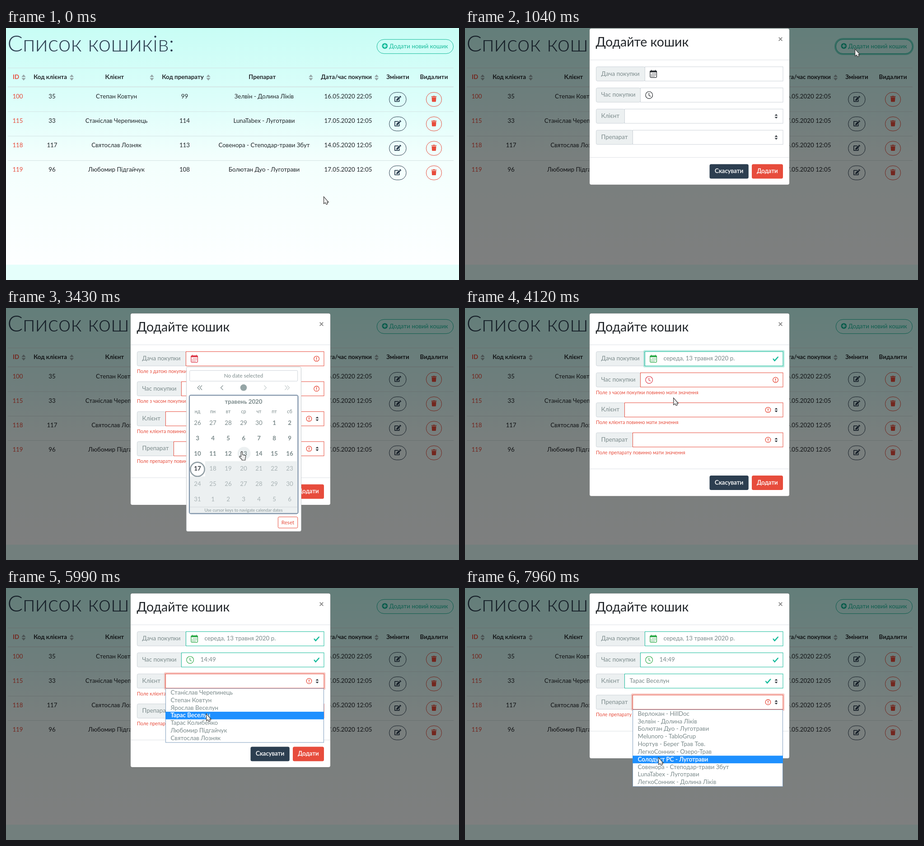
Animation of 1003 by 558 pixels, one loop 8 s. Source, as an HTML page:

```html
<!DOCTYPE html>
<html lang="uk">
<head>
<meta charset="utf-8">
<title>Список кошиків</title>
<style>
html, body { margin: 0; width: 100%; height: 100%; overflow: hidden; }
svg { display: block; width: 1003px; height: 558px; font-family: Lato, "Open Sans", sans-serif; }
text { white-space: pre; }
</style>
</head>
<body>
<svg id="stage" viewBox="0 0 1003 558"></svg>
<script>
const LOOP = 8000;
const RED = '#e74c3c', TEAL = '#18bc9c', NAVY = '#2c3e50', INK = '#212529', MUTED = '#7b8a8b', LINE = '#ced4da';
const stage = document.getElementById('stage');

// Drawing helpers; text is placed by its vertical centre
const text = (x, cy, s, fill = INK, o = {}) => {
  const size = o.size || 13.33;
  return `<text x="${x}" y="${(cy + size * .35).toFixed(2)}" font-size="${size}" fill="${fill}"
    font-weight="${o.weight || 400}" text-anchor="${o.anchor || 'start'}"
    ${o.heavy ? `stroke="${fill}" stroke-width=".3"` : ''}>${s}</text>`;
};
const mid = (x, cy, s, fill, o = {}) => text(x, cy, s, fill, { ...o, anchor: 'middle' });
const rect = (x, y, w, h, fill, stroke = 'none', r = 0, more = '') =>
  `<rect x="${x}" y="${y}" width="${w}" height="${h}" rx="${r}" fill="${fill}" stroke="${stroke}" ${more}/>`;
const circle = (x, y, r, fill, stroke = 'none', w = 1) =>
  `<circle cx="${x}" cy="${y}" r="${r}" fill="${fill}" stroke="${stroke}" stroke-width="${w}"/>`;
const path = (d, fill, stroke = 'none', w = 1, place = '') =>
  `<path d="${d}" fill="${fill}" stroke="${stroke}" stroke-width="${w}" transform="${place}"/>`;
const group = (body, attrs) => `<g ${attrs}>${body}</g>`;
const at = (x, y, s = 1) => `translate(${x} ${y}) scale(${s})`;

const clamp = v => Math.max(0, Math.min(1, v));
const ramp = (t, start, length) => clamp((t - start) / length);
const easeOut = p => 1 - (1 - p) ** 2;
const within = (t, a, b) => t >= a && t < b;

const TRASH = 'M432 32H312l-9-19a24 24 0 0 0-22-13H167a24 24 0 0 0-22 13l-9 19H16A16 16 0 0 0 0 48v32a16 16 0 0 0 16 16h416a16 16 0 0 0 16-16V48a16 16 0 0 0-16-16zM53 467a48 48 0 0 0 48 45h246a48 48 0 0 0 48-45l21-339H32z';
const EDIT = 'M403 83l90 90q7 7 0 14L274 406l-93 10q-23 0-21-22l10-92L389 83q7-7 14 0zM565 60l-49-48q-28-24-55 0l-36 35q-7 7 0 14l90 90q7 7 14 0l36-35q24-28 0-56zM384 346V448H64V128h230l8-4 40-40q9-14-8-20H48Q0 64 0 112v352q0 48 48 48h352q48 0 48-48V306q-4-18-20-8l-40 40z';
const CHECK = 'M2.3 6.73L.6 4.53c-.4-1.04.46-1.4 1.1-.8l1.1 1.4 3.4-3.8c.6-.63 1.6-.27 1.2.7l-4 4.6c-.43.5-.8.4-1.1.1z';
const ARROW = 'M.5.5V16l3.6-2.3 2.2 4 2.9-1.5-1.2-3.6h3.2Z';
const HAND = 'M-1.6 11V1.5a1.6 1.6 0 0 1 3.2 0V7l5.6 1.3q2 .6 1.7 2.6l-1.2 5.6V19H.2v-2L-4.8 12.4q-1.2-2.2.8-2.6Z';

const rows = [
  [100, 35, 'Степан Ковтун', 99, 'Зелвін - Долина Ліків', '16.05.2020 22:05'],
  [115, 33, 'Станіслав Черепинець', 114, 'LunaTabex - Луготрави', '17.05.2020 12:05'],
  [118, 117, 'Святослав Лозняк', 113, 'Совенора - Степодар-трави Збут', '14.05.2020 12:05'],
  [119, 96, 'Любомир Підгайчук', 108, 'Болютан Дуо - Луготрави', '17.05.2020 12:05']
];
const clients = [rows[1][2], rows[0][2], 'Ярослав Веселун', 'Тарас Веселун', 'Тарас Колибенко', rows[3][2], rows[2][2]];
const drugs = ['Верлокан - HillDoc', rows[0][4], rows[3][4], 'Melunoro - TabloGrup', 'Нортув - Берег Трав Тов.',
  'ЛегкоСонник - Озеро-Трав', 'Солодукт РС - Луготрави', rows[2][4], rows[1][4], 'ЛегкоСонник - Долина Ліків'];
const heads = [[22, 'ID', 39], [98, 'Код клієнта', 145.5], [240.3, 'Клієнт', 323], [391.5, 'Код препарату', 448],
  [567.3, 'Препарат', 675], [753.5, 'Дата/час покупки', 820.5], [867.4, 'Змінити'], [947.5, 'Видалити']];
const columns = [26, 102, 244.5, 395.5, 571.5, 757.5];

// Pointer: time, x, y
const track = [[0, 703, 373], [30, 703, 373], [720, 862, 47], [810, 863, 46], [1050, 863, 46], [1640, 668, 322],
  [1760, 668, 322], [2500, 494, 114], [2720, 494, 114], [3430, 522, 318], [3660, 522, 318], [4350, 440, 157],
  [4490, 440, 157], [4890, 451, 306], [4950, 451, 306], [5270, 446, 220], [5390, 446, 212], [5590, 446, 212],
  [5990, 443, 278], [6690, 443, 278], [6810, 434, 268], [6990, 434, 268], [7080, 434, 260], [7290, 434, 260],
  [7950, 428, 375], [LOOP, 428, 375]];

function pointerAt(t) {
  const i = track.findIndex(k => k[0] > t);
  const a = track[i - 1], b = track[i];
  let p = ramp(t, a[0], b[0] - a[0]);
  p = p * p * (3 - 2 * p);
  return [a[1] + (b[1] - a[1]) * p, a[2] + (b[2] - a[2]) * p];
}

function addButton(t) {
  const hover = t < 860 ? easeOut(ramp(t, 665, 150)) : 0;
  const ring = ramp(t, 850, 100) - ramp(t, 1150, 150);
  const face = (fill, plus) => circle(838.8, 39.8, 6.4, fill) +
    path('M838.8 36v7.6M835 39.8h7.6', 'none', plus, 2.2) + text(848.5, 40.3, 'Додати новий кошик', fill);
  return rect(819.5, 23.7, 172.5, 34.6, 'none', TEAL, 17, `stroke-width="3" opacity="${ring * .5}"`) +
    rect(821.2, 25.3, 169.3, 31.4, TEAL, TEAL, 15.7, `fill-opacity="${hover}"`) +
    group(face(TEAL, '#cdfcf5'), `opacity="${1 - hover}"`) +
    group(face('#fff', TEAL), `opacity="${hover}"`);
}

function page(t, py) {
  let s = rect(0, 0, 1003, 524, 'url(#sky)') + rect(0, 524, 1003, 34, '#e5fffb');
  s += text(3.5, 34.7, 'Список кошиків:', NAVY, { size: 49.8, weight: 300 }) + addButton(t);
  s += rect(4, 88, 987, 1, '#d3e3e3') + rect(4, 129.5, 987, 1.8, '#d3e3e3');
  heads.forEach(([x, name, sort], i) => {
    s += mid(x, 108.5, name, i ? INK : RED, { weight: 700 });
    if (sort) s += path('M-4.7-1h9.4L0-6.5ZM-4.7 1.2h9.4L0 6.7Z', '#95a5a6', 'none', 1, at(sort, 109.5));
  });
  rows.forEach((row, i) => {
    const y = i * 54.2;
    if (t < 840 && within(py, 131 + y, 185 + y)) s += rect(4, 131 + y, 987, 54, 'rgba(0,0,0,.05)');
    if (i) s += rect(4, 130.4 + y, 987, 1, '#d3e3e3');
    row.forEach((v, c) => s += mid(columns[c], 151 + y, v, c ? INK : RED));
    s += rect(848.6, 142.5 + y, 37.6, 31.2, 'none', NAVY, 15.6) + path(EDIT, NAVY, 'none', 1, at(860, 150.2 + y, .026));
    s += rect(930.4, 142.5 + y, 34.2, 31.2, 'none', RED, 15.6) + path(TRASH, RED, 'none', 1, at(941.7, 150.2 + y, .026));
  });
  return s;
}

function calendarIcon(y, color) {
  let s = rect(409.8, y - 7, 14.6, 14.8, 'none', color, 1.8, 'stroke-width="1.2"') + rect(409.5, y - 6.5, 15, 2.8, color) +
    path(`M412.7 ${y - 9}v3M421.5 ${y - 9}v3`, 'none', color, 1.2);
  for (let i = 1; i < 11; i++) s += rect(411.8 + i % 4 * 3, y - 1.6 + (i >> 2) * 3, 1.5, 1.5, color);
  return s;
}
const clockIcon = (y, color, full) => circle(407.6, y, 7.8, full ? color : 'none', color, 1.2) +
  path(`M407.3 ${y - 4.6}v5.2l3.7 2.2`, 'none', full ? '#fff' : color, 1.2);

// Field state: 0 plain, 1 missing, 2 valid
function field(f, y) {
  const c = y + 16, x = f.x, border = f.border || [LINE, RED, TEAL][f.state];
  let s = rect(290.4, y + .4, x - 290, 31.6, '#ecf0f1', LINE, 3) + text(301.5, c - .6, f.label, MUTED);
  if (f.ring) s += rect(x - 1.3, y - 1.3, 707 - x, 35, 'none', border, 1, 'stroke-width="3.4" opacity=".3"');
  s += rect(x + .4, y + .4, 703.6 - x, 31.6, '#fff', border);
  if (f.icon) s += f.icon(c + .3, f.tint || [INK, '#dc3545', '#28a745'][f.state], f.full);
  if (f.value) s += text(f.valueX, c - .8, f.value, MUTED);
  if (f.select) s += path('M-3.4-1.2h6.8L0-5ZM-3.4 1.2h6.8L0 5Z', '#343a40', 'none', 1, at(689, c + .5));
  const ix = f.select ? 671 : 687.6;
  if (f.state == 1) {
    s += circle(ix, c + .2, 5.8, 'none', RED, 1.3) + path(`M${ix} ${c - 3}v4`, 'none', RED, 1.7) + circle(ix, c + 3, .95, RED);
    s += text(290, y + 44, f.error, RED, { size: 10.67 });
  }
  if (f.state == 2) s += path(CHECK, TEAL, 'none', 1, at(ix - 7, c - 6.6, 1.8));
  return s;
}

function options(list, x, y, py) {
  const step = 16.85, h = list.length * step + 1.5;
  let s = rect(x + .5, y, 703 - x, h, '#fff', '#7f9dbd');
  list.forEach((name, i) => {
    const top = y + .8 + i * step, on = within(py, top, top + step);
    if (on) s += rect(x, top, 704 - x, step, '#1e90ff');
    s += text(x + 11.5, top + 7.8, name, on ? '#fff' : MUTED, { heavy: on });
  });
  return s;
}

function calendar([px, py]) {
  const gray = '#ecf0f1', small = { size: 11.66 };
  let s = rect(399.4, 130.5, 254, 364, '#fff', '#c4c9cb', 3) + rect(406.7, 138.4, 239, 23.6, '#fff', LINE, 2) +
    mid(526, 150.2, 'No date selected', MUTED, small) + circle(526, 176.3, 7.3, '#95a5a6');
  const chevron = (x, d, o) =>
    group(path(`M${x + 2.5 * d} 171.5l${-5 * d} 5 ${5 * d} 5`, 'none', MUTED, 1.1), `opacity="${o}"`);
  s += chevron(426.5, 1, 1) + chevron(431.5, 1, 1) + chevron(478, 1, 1) +
    chevron(574, -1, .45) + chevron(620, -1, .45) + chevron(625, -1, .45);
  s += rect(406.5, 193.7, 239.5, 261, '#fff', '#a9b9c9', 3, 'stroke-width="4"') + rect(406.5, 193.7, 239.5, 261, '#fff', '#59718c', 2);
  s += rect(407.2, 339.3, 238, 114.7, gray) + rect(407.2, 339.3, 33.6, 33.6, '#fff') + rect(407.2, 440.3, 238, 1, '#d3d9db');
  s += mid(526, 207, 'травень 2020', MUTED, { weight: 700 });
  ['нд', 'пн', 'вт', 'ср', 'чт', 'пт', 'сб'].forEach((d, i) => s += mid(424 + i * 34, 229.5, d, MUTED, { size: 10.67 }));
  for (let i = 0; i < 42; i++) {
    const x = 424 + i % 7 * 34, y = 254.3 + Math.floor(i / 7) * 33.8, day = i - 4;
    const label = day < 1 ? day + 30 : day > 31 ? day - 31 : day;
    if (day < 17 && Math.hypot(px - x, py - y) < 15) s += circle(x + 1, y, 14.4, gray);
    if (day == 17) s += circle(x, y + 1.5, 15.6, '#fff', '#929fa5', 2.6);
    const fill = day == 17 ? '#343a40' : day > 17 ? '#a9b3b5' : MUTED;
    s += mid(x, y, label, fill, { weight: within(day, 1, 18) ? 700 : 400 });
  }
  return s + mid(526, 447.7, 'Use cursor keys to navigate calendar dates', '#8b989a', { size: 9.33 }) +
    rect(602.4, 462.6, 43.4, 24.6, '#fff', RED, 2.5) + mid(624, 474.5, 'Reset', RED, small);
}

function modal(t, pointer) {
  const missing = t >= 1720 ? 1 : 0;
  const state = done => t >= done ? 2 : missing;
  const settling = within(t, 4900, 5000);
  const fields = [
    { label: 'Дача покупки', x: 398, state: state(3650), icon: calendarIcon, error: 'Поле з датою покупки повинно мати значення',
      value: t >= 3650 && 'середа, 13 травня 2020 р.', valueX: 439.5, ring: within(t, 3650, 4400) },
    { label: 'Час покупки', x: 388, state: state(4900), icon: clockIcon, error: 'Поле з часом покупки повинно мати значення',
      value: t >= 4900 && '14:49', valueX: 430.5, border: settling && RED,
      tint: settling && '#dc3545', full: within(t, 4490, 5000) },
    { label: 'Клієнт', x: 353, state: state(6700), select: true, error: 'Поле клієнта повинно мати значення',
      value: t >= 6700 && clients[3], valueX: 364.5, ring: within(t, 5560, 7240) },
    { label: 'Препарат', x: 371, state: state(LOOP), select: true, error: 'Поле препарату повинно мати значення', ring: t >= 7240 }
  ];
  let y = 96.2, body = '';
  for (const f of fields) {
    body += field(f, y);
    f.bottom = y + 32.8;
    y += 46.8 + (f.state == 1 ? 19.6 : 0);
  }
  const foot = y + 13.5;
  const button = (x, w, fill, label) => rect(x, foot + 15.3, w, 32, fill, 'none', 3.5) +
    mid(x + w / 2, foot + 30.2, label, '#fff', { heavy: true });
  let s = rect(275.6, 11.8, 442.8, foot + 49.2, '#fff', 'rgba(0,0,0,.3)', 4) +
    text(289.5, 42, 'Додайте кошик', INK, { size: 28.4 }) + mid(698.5, 35, '×', '#858585', { size: 19, weight: 700 }) +
    rect(276, 81, 442, 1, '#dee2e6') + rect(276, foot, 442, 1, '#dee2e6') + body +
    button(541.5, 86.3, NAVY, 'Скасувати') + button(635, 69, RED, 'Додати');
  if (within(t, 2720, 3650)) s += calendar(pointer);
  if (within(t, 5580, 6700)) s += options(clients, 353, fields[2].bottom, pointer[1]);
  if (t >= 7240) s += options(drugs, 371, fields[3].bottom, pointer[1]);
  const slide = -50 * (1 - easeOut(ramp(t, 880, 300)));
  return group(s, `transform="translate(0 ${slide})" opacity="${ramp(t, 870, 150)}"`);
}

function scene(t) {
  const pointer = pointerAt(t);
  const hand = within(t, 650, 840) || within(t, 1590, 1780) || within(t, 2860, 3660);
  let s = `<defs><linearGradient id="sky" x2="0" y2="1"><stop stop-color="#c8fdf5"/>
    <stop offset=".3" stop-color="#dcfefa"/><stop offset=".55" stop-color="#f3fffd"/>
    <stop offset="1" stop-color="#fdffff"/></linearGradient></defs>` + page(t, pointer[1]);
  if (t >= 840) s += rect(0, 0, 1003, 558, '#000', 'none', 0, `opacity="${ramp(t, 840, 150) * .5}"`) + modal(t, pointer);
  return s + path(hand ? HAND : ARROW, '#ececec', '#333', 1.1, at(...pointer));
}

let shown;
function frame() {
  const next = scene(performance.now() % LOOP);
  if (next !== shown) stage.innerHTML = shown = next;
  requestAnimationFrame(frame);
}
frame();
</script>
</body>
</html>
```
